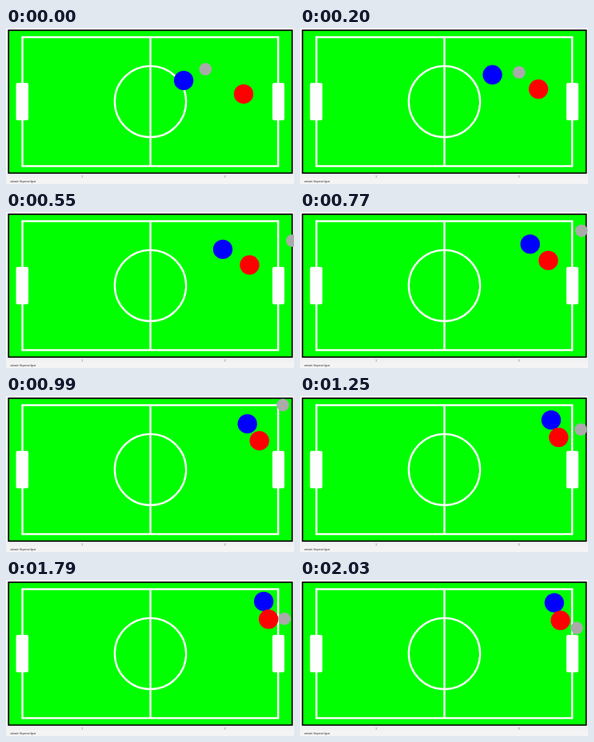
Write an HTML page that moves like this. It is 360 by 196 pixels and loops after 2.05 s.

```html
<!DOCTYPE html>
<html lang="en">
<head>
<meta charset="utf-8">
<title>Robot football</title>
<style>
  html, body { margin: 0; width: 100%; height: 100%; overflow: hidden; background: #f4f4f4; }
  svg { display: block; width: 360px; height: 196px; }
  text { font-family: "Liberation Sans", Arial, sans-serif; }
  .lines { fill: none; stroke: #fff; stroke-width: 2.4; }
</style>
</head>
<body>
<svg viewBox="0 0 360 196">
  <rect width="360" height="196" fill="#f4f4f4"/>
  <rect y="184" width="360" height="5" fill="#f0f2f4"/>
  <rect x="3.2" y="2.8" width="354.5" height="179.5" fill="#0f0" stroke="#000" stroke-width="1.7"/>
  <g class="lines">
    <rect x="20.5" y="11.5" width="319.7" height="162"/>
    <path d="M180.5 11.5V173.5"/>
    <circle cx="180.5" cy="92.5" r="44.6"/>
  </g>
  <g fill="#fff">
    <rect x="12.5" y="69" width="15.5" height="47" rx="2"/>
    <rect x="333" y="69" width="15" height="47" rx="2"/>
  </g>
  <g font-size="4" fill="#777" text-anchor="middle">
    <text x="95" y="188.3">1</text>
    <text x="273.5" y="188.3">2</text>
  </g>
  <text x="5.5" y="193.6" font-size="2.8" fill="#222">animate: Sequence figure</text>
  <circle id="blue" r="12.2" fill="#00f"/>
  <circle id="red" r="12.2" fill="#f00"/>
  <circle id="ball" r="7.8" fill="#aaa"/>
</svg>
<script>
const LOOP = 2050;
const REACH = 1700; // when both players get deepest into the corner

// Points where the ball starts, rebounds and ends: time in ms, x, y
const rebounds = [
  [0, 249.2, 51.8], [320, 288.5, 58.2], [550, 357.8, 36], [990, 346, 11.3],
  [1250, 351, 42], [1550, 350, 37], [2030, 346, 60.3]
];

function place(id, x, y) {
  const disc = document.getElementById(id);
  disc.setAttribute("cx", x);
  disc.setAttribute("cy", y);
}

function ballAt(time) {
  const next = rebounds.findIndex(([t]) => t > time);
  if (next < 0) return rebounds.at(-1).slice(1);
  const [t0, x0, y0] = rebounds[next - 1];
  const [t1, x1, y1] = rebounds[next];
  const u = (time - t0) / (t1 - t0);
  return [x0 + (x1 - x0) * u, y0 + (y1 - y0) * u];
}

function draw(time) {
  // Players slow down into the corner, then drift back a little.
  const s = Math.sin(Math.PI / 2 * time / REACH);
  place("blue", 222 + 100.5 * s, 66 - 39.2 * s);
  place("red", 297 + 31.4 * s * s, 83 - 33.8 * s);
  place("ball", ...ballAt(time));
}

const start = performance.now();
function tick() {
  draw((performance.now() - start) % LOOP);
  requestAnimationFrame(tick);
}
tick();
</script>
</body>
</html>
```
